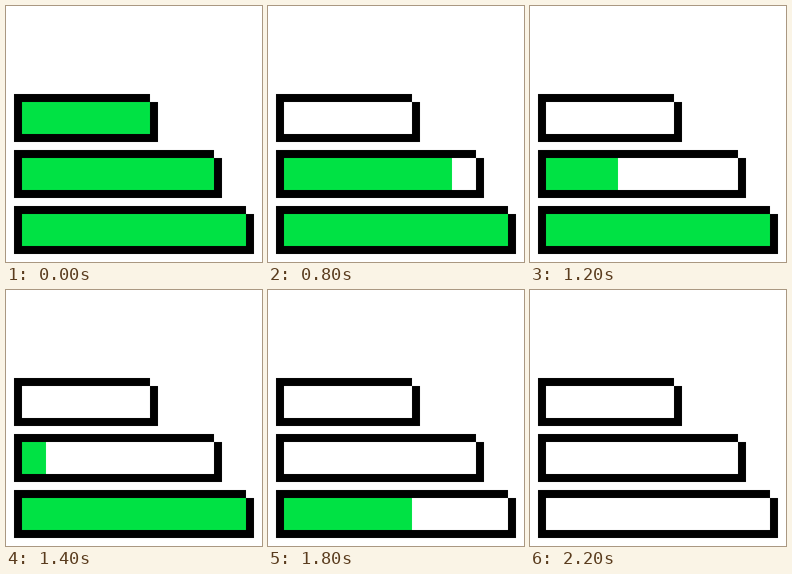
An HTML page with a canvas that plays this animation: 320 px wide and 320 px high, repeating every 2.3 s.

```html
<!DOCTYPE html>
<html>
<head>
<meta charset="utf-8">
<style>
  html, body { margin: 0; height: 100%; overflow: hidden; background: #fff; }
  canvas { display: block; width: 320px; height: 320px; }
</style>
</head>
<body>
<canvas id="stage" width="320" height="320"></canvas>
<script>
const ctx = document.getElementById('stage').getContext('2d');
const STEP = 100, LOOP = 2300;

// Bars drain one after another, `drop` pixels per step from step `start`.
const bars = [
  { y: 120, width: 160, start: 0, drop: 20, skip: 1 }, // first step drops twice
  { y: 190, width: 240, start: 7, drop: 30, skip: 0 },
  { y: 260, width: 280, start: 15, drop: 40, skip: 0 },
];

function rect(color, x, y, w, h) {
  ctx.fillStyle = color;
  ctx.fillRect(x, y, w, h);
}

function drawBar({ y, width, start, drop, skip }, step) {
  const n = step - start;
  const left = n > 0 ? Math.max(0, width - drop * (n + skip)) : width;
  rect('#000', 10, y - 10, width + 20, 60);
  rect('#fff', width + 20, y - 10, 10, 10); // notched corner
  rect('#fff', 20, y, width, 40);
  rect('#00e244', 20, y, left, 40);
}

function draw(now) {
  const step = Math.floor((now % LOOP) / STEP);
  rect('#fff', 0, 0, 320, 320);
  bars.forEach(bar => drawBar(bar, step));
}

const begin = performance.now();
function tick() {
  draw(performance.now() - begin);
  requestAnimationFrame(tick);
}
tick();
</script>
</body>
</html>
```
